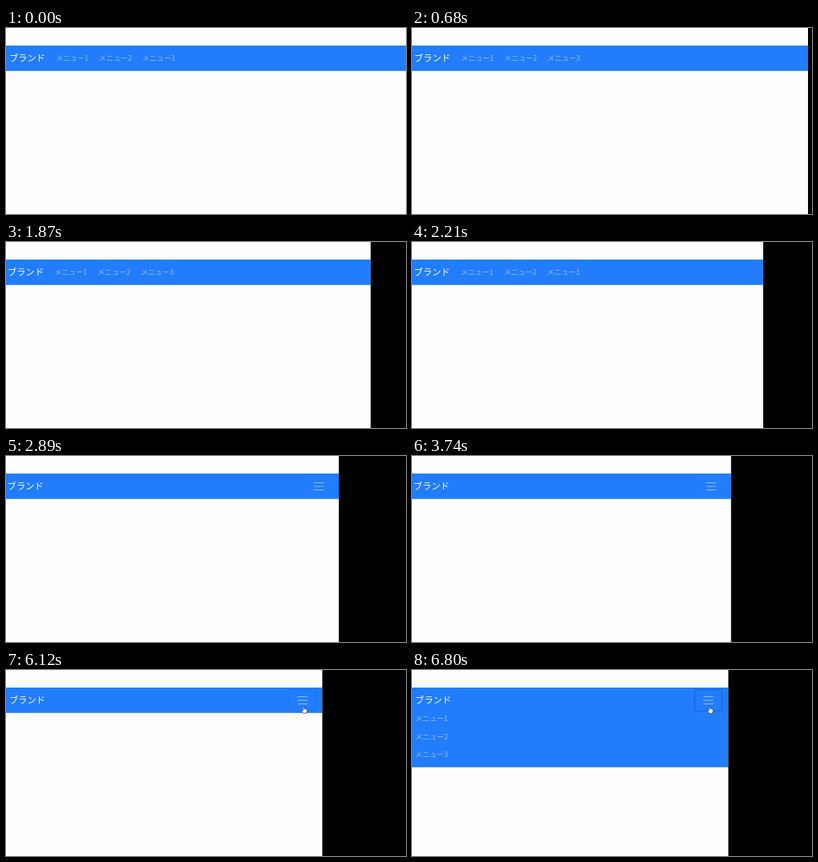
An HTML page that plays this animation: 500 by 233 pixels, repeating every 8 s.

```html
<!DOCTYPE html>
<html lang="ja">
<head>
<meta charset="utf-8">
<title>Responsive navbar</title>
<style>
html, body { margin: 0; width: 100%; height: 100%; overflow: hidden; background: #fefefe; }
svg { display: block; width: 100vw; height: 100vh; }
text { font-family: "Noto Sans CJK JP", "Noto Sans CJK", "Noto Sans JP", sans-serif; fill: #fff; }
.brand { font-size: 11.3px; }
.link { font-size: 9px; fill-opacity: .5; }
</style>
</head>
<body>
<svg viewBox="0 0 500 233" preserveAspectRatio="none">
  <defs>
    <clipPath id="barClip"><rect id="clipBox" x="0" y="22" width="500" height="31.8"/></clipPath>
  </defs>
  <rect width="500" height="233" fill="#fefefe"/>
  <rect id="bar" y="22" width="500" height="31.8" fill="#217dfb"/>
  <g clip-path="url(#barClip)">
    <g id="content">
      <text class="brand" x="3.9" y="42">ブランド</text>
      <g id="links"></g>
    </g>
  </g>
  <g id="toggler">
    <rect id="ring" fill="none" rx="2.5"/>
    <path d="M-6.3 -4.5h12.6M-6.3 0h12.6M-6.3 4.5h12.6" stroke="#fff" stroke-opacity=".5" stroke-width="1.1"/>
  </g>
  <rect id="outside" width="500" height="233" fill="#000"/>
  <path id="arrow" d="M0 0V7.2L1.5 5.8L2.7 8.6L3.8 8.1L2.6 5.4H4.6Z" fill="#111" stroke="#fff" stroke-width=".5"/>
  <path id="hand" d="M-.8 .6Q0 -.5 .8 .6V3Q1.7 2.5 2.1 3.3Q3 2.9 3.3 3.7Q4.3 3.5 4.3 4.6V6.2L3.4 8.6H-.5L-2.7 5.6Q-2.9 4.5 -1.8 4.8L-.8 5.6Z" fill="#fff" stroke="#152a4a" stroke-width=".65" stroke-linejoin="round"/>
</svg>
<script>
const LOOP = 8000, STEP = 170, BREAKPOINT = 432;
const BAR_HEIGHT = 31.8, MENU_HEIGHT = 68;
const $ = id => document.getElementById(id);

// [time, value] pairs
const widthKeys = [[170, 500], [680, 495], [1360, 481], [2210, 439], [2550, 432],
  [3060, 408], [3230, 408], [3740, 398.8], [4080, 395.4]];
const shiftKeys = [[170, 0], [1360, -2.5], [2210, -1.5], [2720, -2.3], [3740, -2.2], [4080, 0]];
const cursorX = [[4930, 387.8], [5440, 382], [5950, 372.8], [6120, 372]];
const cursorY = [[4930, 97.5], [5270, 86], [5610, 60], [5950, 46.5], [6120, 45.6]];
const openKeys = [[6290, 0], [6460, .25], [6630, .8], [6800, 1]];

function at(keys, t) {
  if (t <= keys[0][0]) return keys[0][1];
  for (let i = 1; i < keys.length; i++) {
    const [t0, a] = keys[i - 1], [t1, b] = keys[i];
    if (t <= t1) return a + (b - a) * (t - t0) / (t1 - t0);
  }
  return keys[keys.length - 1][1];
}

function set(el, attrs) {
  for (const name in attrs) el.setAttribute(name, attrs[name]);
}

function show(el, visible) {
  el.setAttribute("visibility", visible ? "visible" : "hidden");
}

const links = ["1", "2", "3"].map(digit => {
  const el = document.createElementNS("http://www.w3.org/2000/svg", "text");
  el.setAttribute("class", "link");
  el.textContent = "メニュー" + digit;
  $("links").appendChild(el);
  return el;
});

function drawRing(hover, pressed) {
  const w = pressed ? 34.5 : hover ? 33.5 : 31.5;
  const h = pressed ? 26.5 : hover ? 26 : 22.5;
  set($("ring"), {
    x: -w / 2, y: -h / 2, width: w, height: h,
    stroke: pressed ? "#1a6ae6" : hover ? "#1d73f0" : "#fff",
    "stroke-opacity": hover || pressed ? 1 : .05,
    "stroke-width": pressed ? 1.7 : hover ? .9 : .6
  });
}

function render(time) {
  const t = Math.floor(time / STEP) * STEP;
  const width = at(widthKeys, t);
  const collapsed = width < BREAKPOINT;
  const open = at(openKeys, t);
  const height = BAR_HEIGHT + MENU_HEIGHT * open;

  set($("bar"), { width, height });
  set($("clipBox"), { height });
  set($("outside"), { x: width });
  set($("content"), { transform: `translate(${at(shiftKeys, t)} 0)` });
  links.forEach((el, i) => {
    set(el, collapsed ? { x: 4, y: 64 + 22.5 * i } : { x: 62.3 + 54 * i, y: 41.4 });
    show(el, !collapsed || open > 0);
  });

  const x = at(cursorX, t), y = at(cursorY, t);
  const moving = t >= 4930, hover = moving && y < 51;
  set($("toggler"), { transform: `translate(${width - 24.9} 38)` });
  show($("toggler"), collapsed);
  drawRing(hover, open > 0);

  for (const id of ["arrow", "hand"]) set($(id), { transform: `translate(${x} ${y})` });
  show($("arrow"), moving && !hover);
  show($("hand"), hover);
}

const start = performance.now();
function tick() {
  render((performance.now() - start) % LOOP);
  requestAnimationFrame(tick);
}
tick();
</script>
</body>
</html>
```
